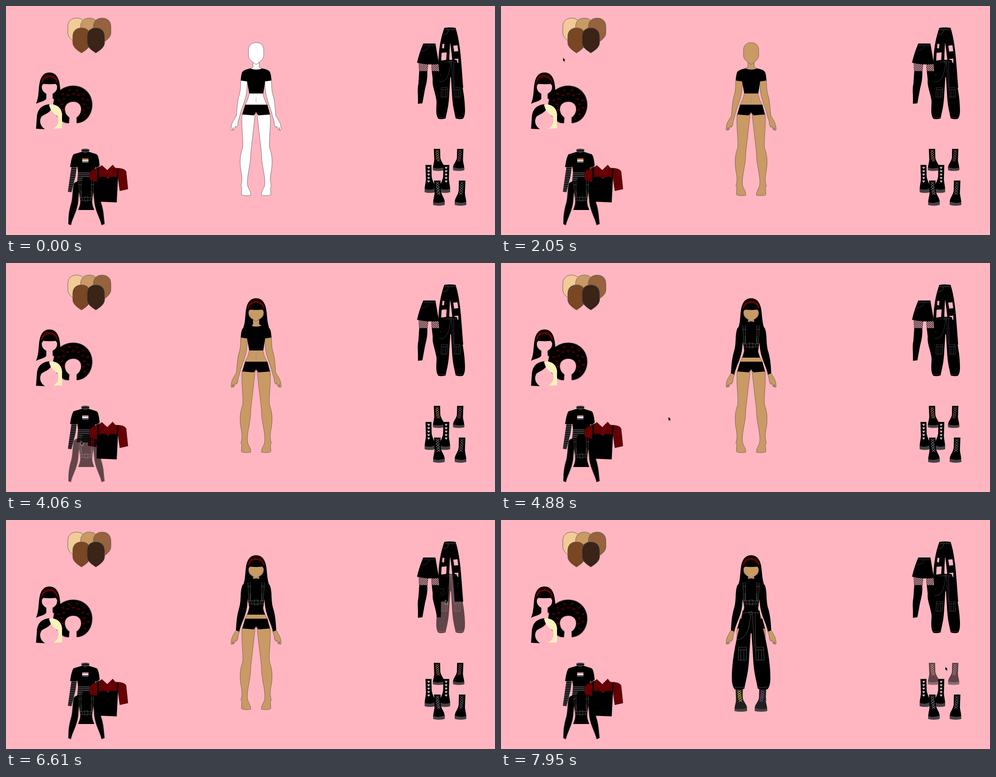
Recreate the animation shown at these times as an HTML page. Size 1091 by 513 pixels, loop 8000 ms.

```html
<!DOCTYPE html>
<html lang="en">
<head>
<meta charset="utf-8">
<title>Dress-up doll</title>
<style>
  html, body { margin: 0; width: 100%; height: 100%; overflow: hidden; background: #ffb6c1; }
  svg { display: block; width: 100%; height: 100%; }
  .skin { fill: var(--skin); stroke: #5a5552; stroke-width: .8; }
  .seam { fill: none; stroke: #858585; stroke-width: .6; }
  .red { fill: #650003; }
  .mirror { transform: matrix(-1, 0, 0, 1, 1116, 0); }
  .worn { opacity: 0; }
  #body { --skin: #fff; }
</style>
</head>
<body>
<svg viewBox="0 0 1091 513">
  <defs>
    <path id="head" d="M541 99C541 87 549 82 558 82S575 87 575 99V112C574 121 564 127 558 131C552 127 542 121 541 112Z"/>
    <g id="limbs">
      <path d="M527 242C524 266 530 298 528 318C522 334 521 349 524 369C528 388 526 396 524 403L526 407L525 422C528 426 541 425 546 424C547 416 541 410 539 402C536 383 547 353 546 330C549 302 553 270 556 240Z"/>
      <path d="M524 163C523 180 524 190 519 204C516 217 515 235 514 246C509 254 504 262 503 268L502 277L504 279L507 272L506 278L509 277L512 269L514 272L517 267L518 258L521 249C524 232 533 215 536 198C538 187 538 178 539 163Z"/>
    </g>
    <pattern id="stripes" width="8" height="4" patternUnits="userSpaceOnUse">
      <path d="M0 0H8V4H0Z"/><path d="M0 2H8" stroke="#aaa" stroke-width=".9"/>
    </pattern>
    <pattern id="net" width="4" height="4" patternUnits="userSpaceOnUse">
      <path d="M0 0L4 4M4 0L0 4" stroke="#000" stroke-width=".9"/>
    </pattern>
    <g id="bob">
      <path d="M67 219C74 203 72 186 75 172C78 156 86 149 97 149C109 149 116 157 119 171C122 187 121 200 126 215C116 213 107 210 104 207V196.5C110 193 114 189 114 182V179L111 174.5Q97 176 83 174.5L80 179V182C80 189 84 193 90 196.5V207C88 213 78 214 67 219Z"/>
      <path class="red" d="M78 172C81 149 113 149 116 172L112 170C108 156 86 156 82 170Z"/>
    </g>
    <g id="harnessHalf">
      <path d="M559 131Q552 131 549 133V137C542 140 529 141 527 147C523 164 525 185 519 201C514 220 514 234 513 247L520 250C524 232 535 216 538 193L540 168L543 186C544 197 541 204 538 212H559Z"/>
      <path class="seam" d="M540 140V148L542 181M545 139V181M539 149H546M541 181H558M541 188H558M554 179V190H558M554 179H558M548 181V188M545 164Q548 178 541 188"/>
    </g>
    <g id="harness"><use href="#harnessHalf"/><use href="#harnessHalf" class="mirror"/></g>
    <g id="cargoHalf">
      <path d="M559 202Q548 201 539 203C538 220 531 242 526 266C519 298 515 328 515 354Q515 371 521 379Q532 382 543 378C546 360 551 346 553 318L557 254H559Z"/>
      <path class="seam" d="M540 209Q549 207 558 207M521 374Q532 377 543 374M530 285H548L547 314H529ZM530 291H548M535 291V314M542 291V314"/>
    </g>
    <g id="cargo">
      <use href="#cargoHalf"/><use href="#cargoHalf" class="mirror"/>
      <path class="seam" d="M553 207L560 205V210L555 212ZM558 212C554 235 551 256 540 263Q531 270 524 267M561 209L565 283L568 282L567 208"/>
    </g>
    <g id="boot">
      <path d="M2 0H16L16.500 20C18 29 24 33 25 41V45H0C0 37 3 30 3 24Z"/>
      <path d="M0 42Q12 46 25 41V48Q12 51 0 48Z" fill="#454245"/>
    </g>
    <path id="heart" d="M0 2.500L-3 -.4Q-2 -3 0 -1Q2 -3 3 -.4Z" fill="#c5b9c0"/>
    <path id="fly" class="red" d="M0 0L-3 -2.500L-2.500 .5L-2 3L0 1L2 3L2.500 .5L3 -2.500Z"/>
    <path id="flagBand" d="M170 341.500H184V344.500H170Z"/>
  </defs>

  <g id="heads"></g>

  <g id="hairBob"><use href="#bob"/></g>
  <g id="afro">
    <path d="M140 262Q126 263 119 250C106 243 104 225 107 213C110 192 130 179 150 179C176 179 192 199 192 221C192 243 178 261 158 262V250C164 246 168 239 168 231C168 220 160 214 150 214S131 220 131 231C131 239 135 246 141 250Z" stroke="#000" stroke-width="2" stroke-dasharray="1.7 1.5"/>
  </g>
  <g>
    <path d="M97 220C78 222 71 232 69 247L67 275L87 276C76 269 73 256 80 247C88 242 96 239 100 233Z"/>
    <path d="M96 221C112 218 124 228 125 242V274L105 275C116 269 120 258 115 247C107 242 99 235 96 221Z" fill="#f9f1bd"/>
  </g>

  <g id="shirt">
    <path d="M168 321Q177 319 186 321L185 328H169ZM146 360H158L155 382L146 417L138 416ZM200 360H210L214 416H207ZM161 368H196L200 402H158Z" fill="url(#stripes)"/>
    <path d="M168 327Q177 330 186 327L202 332Q207 335 209 358L199 362L197 373H161L159 360L143 361Q146 338 151 332Z"/>
    <g id="flag"></g>
    <g id="flagCool" class="worn"></g>
  </g>
  <g id="corset">
    <path class="red" d="M205 363L214 357L226 368L238 356L244 363Q265 363 268 371L272 410L254 414L250 385H208L201 412L183 409L187 374Q190 366 205 363Z" stroke="#390002" stroke-width=".7"/>
    <path d="M204 363H207L208 385Q216 379 227 386Q237 380 247 384L248 364H251L249 402L247 440L202 438L203 399Z"/>
  </g>
  <g id="harnessRack"><use href="#harness" transform="translate(179 384)scale(.9)translate(-558 -131)"/></g>

  <g id="skirt">
    <path d="M922 146H940C941 163 937 178 935 185L929 218L919 219C920 200 917 187 920 175ZM950 146H966C972 165 971 190 970 218H961C960 198 950 180 952 165Z"/>
    <path d="M921 127H942L940 146H922ZM949 127H965L964 146H950Z" fill="url(#net)" stroke="#222" stroke-width=".6"/>
    <path d="M931 84H958L966 130Q942 133 917 127Q922 105 931 84Z"/>
    <path class="seam" d="M931 89H958M927 101Q941 99 944 90" stroke-dasharray="2 1"/>
  </g>
  <g id="jeans">
    <path d="M978 49Q990 47 1003 49C1010 70 1014 100 1016 130L1020 183H1001C999 150 995 110 991 82C988 110 990 150 986 183H967L965 120C966 90 972 65 978 49Z"/>
    <path d="M998 89L1007 88L1009 101L1000 102ZM972 105L983 104L982 121L971 122ZM974 85H978L977 95L973 94ZM1000 119L1009 118V128Z" fill="#ffb6c1" stroke="#bb8992" stroke-dasharray="1 1"/>
    <path class="seam" d="M978 53H1003M975 65Q986 64 987 54M969 155L978 153L975 166L969 164L977 157M1005 143L1010 141L1008 151L1005 148"/>
  </g>
  <g id="cargoRack"><use href="#cargo" transform="translate(992 120)scale(.745)translate(-558 -201)"/></g>

  <g id="bootsTall"></g>
  <g id="bootsHeart"></g>
  <g id="bootsShort"></g>

  <g id="body">
    <path d="M551 127V137L528 147L538 168L543 196Q540 211 533 222L528 241H588L583 222Q576 211 573 196L578 168L588 147L565 137V127Z" class="skin"/>
    <use href="#limbs" class="skin"/>
    <use href="#limbs" class="skin mirror"/>
    <use href="#head" class="skin"/>
    <path d="M558 203V216" class="seam"/>
  </g>
  <path d="M546 140Q558 145 571 140Q586 142 589 148Q592 155 592 167L578 169L574 196H543L538 169L524 167Q524 155 527 148Q531 142 546 140ZM534 221H583L589 243L563 245L558 238L553 245L527 243Z"/>
  <g id="wornHair" class="worn"><use href="#bob" x="461" y="-70"/></g>
  <g id="wornBoots" class="worn"></g>
  <g id="wornHarness" class="worn"><use href="#harness"/></g>
  <g id="wornCargo" class="worn"><use href="#cargo"/></g>

  <path id="cursor" class="worn" d="M0 0V9.500L2.200 7.600L3.800 11L5.300 10.300L3.800 7H6.600Z" stroke="#fff" stroke-width=".6"/>
</svg>
<script>
const LOOP = 8000;
const $ = id => document.getElementById(id);
const repeat = (count, draw) => Array.from({ length: count }, (_, i) => draw(i)).join('');

// Skin swatches: three behind, two in front
const tones = ['#f3cb96', '#c99a64', '#97623e', '#794723', '#3a2317'];
$('heads').innerHTML = repeat(tones.length, i => {
  const front = i > 2;
  const x = front ? 168.5 + 32 * (i - 3) : 157.5 + 28.5 * i;
  return `<g id="tone${i}"><use href="#head" class="skin" style="--skin:${tones[i]}"
    transform="translate(${x} ${front ? 49 : 27})scale(1.15)translate(-558 -82)"/></g>`;
});

// Butterflies zigzag along the curve of the hair
$('afro').innerHTML += repeat(19, i => {
  const angle = (140 + 260 * i / 18) * Math.PI / 180;
  const radius = i % 2 ? 25 : 34;
  return `<use href="#fly" x="${150 + radius * Math.cos(angle)}" y="${221 + radius * Math.sin(angle)}"/>`;
});

const flag = (id, colors) => $(id).innerHTML =
  repeat(3, i => `<use href="#flagBand" y="${i * 3}" fill="${colors[i]}"/>`);
flag('flag', ['#d27a34', '#fff0d0', '#9a8b7c']);
flag('flagCool', ['#c98086', '#fff', '#514f78']);

const laces = color => `<path fill="none" stroke="${color}" d="${repeat(5, i => {
  const x = 6 + i * i * .15, y = 3 + i * 5;
  return `M${x} ${y}l7 5m0 -5l-7 5`;
})}"/>`;
const hearts = repeat(5, i => `<use href="#heart" x="9.500" y="${5 + 6 * i}"/>`);

// A pair is one boot and its mirror image between the outer edges
function pair(id, left, right, y, sx, sy, trims, fill = '#000') {
  $(id).innerHTML = repeat(2, i => `<g fill="${fill}" transform="translate(${i ? right : left} ${y})
    scale(${i ? -sx : sx} ${sy})"><use href="#boot"/>${trims[i]}</g>`);
}
pair('bootsTall', 952.5, 1022.5, 320, 1, 1, [laces('#cf9a59'), laces('#8f6a7c')]);
pair('bootsHeart', 934, 991, 356, .95, 1.27, [hearts, hearts]);
pair('bootsShort', 953, 1027, 391, 1.03, 1.14, [laces('#777'), laces('#666')]);
pair('wornBoots', 521, 594, 378, 1.12, 1.04, [laces('#c3b638'), laces('#73507d')], '#202020');

function track(id, steps, easing = 'steps(1, end)') {
  const frames = steps.map(([time, style]) => ({ offset: Math.min(time / LOOP, 1), easing, ...style }));
  frames.push({ ...frames[frames.length - 1], offset: 1 });
  $(id).animate(frames, { duration: LOOP, iterations: Infinity });
}
const show = (id, time) => track(id, [[0, { opacity: 0 }], [time, { opacity: 1 }]]);

// Where the pointer goes, which item it rests on and what a click puts on the doll
const stops = [
  { at: 600, x: 222, y: 0 },
  { at: 880, until: 1370, x: 183, y: 40, over: 'tone1' },
  { at: 2050, x: 138, y: 115 },
  { at: 2600, until: 3070, x: 124, y: 187, over: 'hairBob', wear: 'wornHair' },
  { at: 3500, x: 182, y: 340, over: 'shirt' },
  { at: 3720, x: 222, y: 388, over: 'corset' },
  { at: 4060, until: 4560, x: 167, y: 399, over: 'harnessRack', wear: 'wornHarness' },
  { at: 5360, x: 681, y: 262 },
  { at: 5780, x: 867, y: 154 },
  { at: 5920, x: 930, y: 162, over: 'skirt' },
  { at: 6200, until: 6690, x: 980, y: 179, over: 'cargoRack', wear: 'wornCargo' },
  { at: 7400, until: LOOP, x: 991, y: 328, over: 'bootsTall', wear: 'wornBoots' },
];
const REACH = 120;
for (const { at, until = at, over, wear } of stops) {
  if (over) track(over, [[0, { opacity: 1 }], [at - REACH, { opacity: .62 }], [until + REACH, { opacity: 1 }]]);
  if (wear) show(wear, Math.min(until, at + 490));
}
track('cursor', stops.flatMap(({ at, until = at, x, y }) =>
  [at, until].map(time => [time, { transform: `translate(${x}px, ${y}px)` }])), 'linear');
track('body', [[0, { '--skin': '#fff' }], [1370, { '--skin': tones[1] }]]);
show('flagCool', 3920);
show('cursor', stops[0].at);
</script>
</body>
</html>
```
